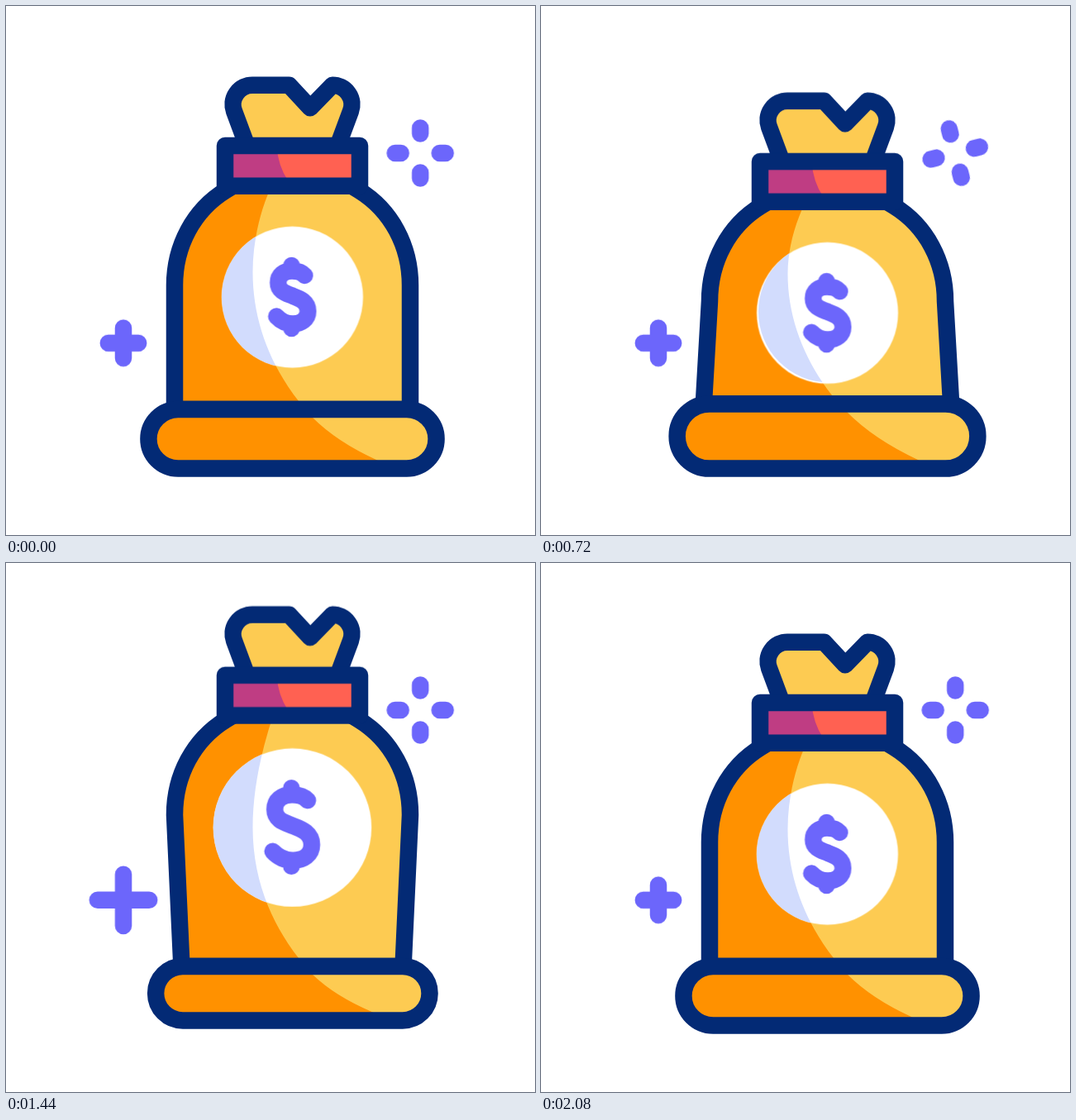
Write an HTML page without scripts that moves like this. It is 640 by 640 pixels and loops after 2.72 s.

```html
<!DOCTYPE html>
<html lang="en">
<head>
<meta charset="utf-8">
<title>Money bag</title>
<style>
  html, body { margin: 0; width: 100%; height: 100%; overflow: hidden; background: #fff; }
  svg { display: block; width: 100vw; height: 100vh; }

  .line { fill: none; stroke: #032a75; stroke-width: 20.5; stroke-linejoin: round; stroke-linecap: round; }
  .accent { fill: none; stroke: #6c66fb; stroke-width: 20.5; stroke-linejoin: round; stroke-linecap: round; }
  .accent path { vector-effect: non-scaling-stroke; }
  .gold { fill: #fdcb52; }
  .orange { fill: #ff9100; }

  /* Every bag part shares three poses: rest, squash and stretch */
  .shape, .move, .plus, .spark {
    animation: 2720ms cubic-bezier(.333, 0, .667, 1) infinite;
  }
  .shape { d: var(--rest); animation-name: shape; }
  .move { transform: var(--rest); animation-name: move; }
  @keyframes shape {
    0%, 1.47%, 69.49%, 100% { d: var(--rest); }
    24.26%, 25.92% { d: var(--squash); }
    45.96%, 51.1% { d: var(--stretch); }
  }
  @keyframes move {
    0%, 1.47%, 69.49%, 100% { transform: var(--rest); }
    24.26%, 25.92% { transform: var(--squash); }
    45.96%, 51.1% { transform: var(--stretch); }
  }

  .body {
    --rest: path("M280 214.5L266 223C227 247 204 290 204 338L204 488L489 488L489 338C489 290 466 247 427 223L413 214.5Z");
    --squash: path("M280 233.7L266 242.2C227 266.2 204 309.2 204 357.2L196.8 481.5L496.2 481.5L489 357.2C489 309.2 466 266.2 427 242.2L413 233.7Z");
    --stretch: path("M280 180.2L266 188.7C227 212.7 204 255.7 204 303.7L212.7 488L480.3 488L489 303.7C489 255.7 466 212.7 427 188.7L413 180.2Z");
  }
  .shade {
    --rest: path("M321 218C306 251 298.5 288 298.5 322C298.5 380 319 433 354 478L362 488L204 488L204 338C204 290 227 247 266 223L280 214.5Z");
    --squash: path("M320 237C306 266 298.5 296 298.5 324C298.5 377 318 427 352 471L361 481.5L196.8 481.5L204 357.2C204 309.2 227 266.2 266 242.2L280 233.7Z");
    --stretch: path("M323 184C308 230 298.5 276 298.5 320C298.5 380 319 433 354 478L362 488L212.7 488L204 303.7C204 255.7 227 212.7 266 188.7L280 180.2Z");
  }
  .base {
    --rest: path("M208.2 488A35.8 35.8 0 0 0 208.2 559.6L484.8 559.6A35.8 35.8 0 0 0 484.8 488Z");
    --squash: path("M203.7 481.4A39.1 39.1 0 0 0 203.7 559.6L489.3 559.6A39.1 39.1 0 0 0 489.3 481.4Z");
    --stretch: path("M214 488A32.6 32.6 0 0 0 214 553.2L479.7 553.2A32.6 32.6 0 0 0 479.7 488Z");
  }
  .base-shade {
    --rest: path("M208.2 488A35.8 35.8 0 0 0 208.2 559.6L471 559.6L448 549Q400 527 371 498L361 488Z");
    --squash: path("M203.7 481.4A39.1 39.1 0 0 0 203.7 559.6L479 559.6L456 549Q402.5 524 370 491L360.5 481.4Z");
    --stretch: path("M214 488A32.6 32.6 0 0 0 214 553.2L466 553.2L443 543Q398 524 371 498L361 488Z");
  }
  .top {
    --rest: translate(0, 0);
    --squash: translate(0, 19.2px);
    --stretch: translate(0, -34.3px);
  }
  .coin {
    --rest: translate(346.5px, 352.2px) scale(1);
    --squash: translate(346.5px, 371.5px) scale(1);
    --stretch: translate(346.5px, 319px) scale(1.123);
  }
  .coin-shade {
    --rest: translate(346.5px, 352.2px) scale(1);
    --squash: translate(348.5px, 370px) scale(1);
    --stretch: translate(346.5px, 319px) scale(1.123);
  }
  .dollar {
    --rest: translate(346.5px, 352px) scale(1);
    --squash: translate(346.5px, 371.3px) scale(1);
    --stretch: translate(346.5px, 318.5px) scale(1.25);
  }

  .plus { animation-name: grow; }
  @keyframes grow {
    0%, 36.76%, 74.63%, 100% { transform: scale(1); }
    52.94%, 58.46% { transform: scale(1.714); }
  }
  .spark { animation-name: spin; }
  @keyframes spin {
    0%, 9.96% { transform: rotate(0deg); }
    44.89%, 100% { transform: rotate(360deg); }
  }
</style>
</head>
<body>
<svg viewBox="0 0 640 640">
  <clipPath id="disc"><circle class="move coin-shade" r="85.5"/></clipPath>

  <path class="shape body gold"/>
  <path class="shape shade orange"/>
  <circle class="move coin" r="85.5" fill="#fff"/>
  <g clip-path="url(#disc)"><path class="shape shade" fill="#d2dcfd"/></g>
  <g class="accent">
    <path class="move dollar" d="M14.8-26C10.8-30.8 5.2-31.6-.4-31.6C-10.8-31.6-17.2-26-17.2-17.2C-17.2-6.8-7.6-4.4 .4-1.2C9.2 2 18.8 6 18.8 17.2C18.8 26.8 10.8 32.4 .4 32.4C-7.6 32.4-14 29.2-19.2 23.6M-1-38V-32M-1 38V33"/>
  </g>
  <path class="shape body line"/>

  <path class="shape base gold"/>
  <path class="shape base-shade orange"/>
  <path class="shape base line"/>

  <g class="move top">
    <path class="line" style="fill:#fdcb52" d="M290.4 166L276 127.3A23.5 23.5 0 0 1 298 95.7H342.5L368 123.3L395 95.7A23.5 23.5 0 0 1 417 127.3L402.6 166"/>
    <path fill="#ff6152" d="M265 169H428V217.7H265Z"/>
    <path fill="#bf3d83" d="M265 169H327.5Q329 193 341 211V217.7H265Z"/>
    <path class="line" d="M265 169H428V217.7H265Z"/>
  </g>

  <g class="accent" transform="translate(142 407.8)">
    <path class="plus" d="M-18.2 0H18.2M0-18.2V18.2"/>
  </g>
  <g class="accent" transform="translate(501.2 178)">
    <path class="spark" d="M0-30.5V-23.5M0 23.5V30.5M-30.5 0H-23.5M23.5 0H30.5"/>
  </g>
</svg>
</body>
</html>
```
